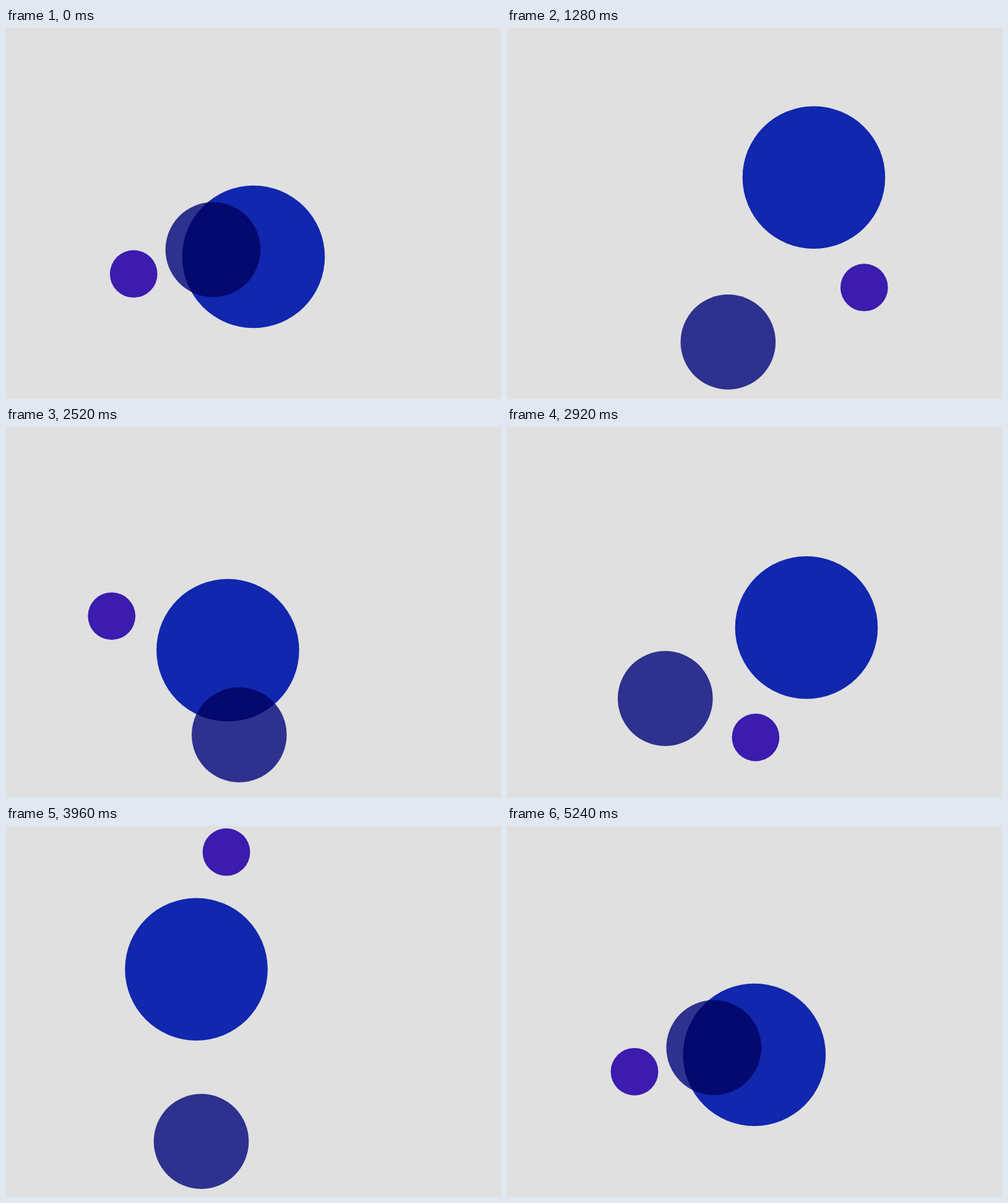
Recreate the animation shown at these times as an HTML page with a canvas. Size 800x600 px, loop 5280 ms.

```html
<!DOCTYPE html>
<html lang="en">
<head>
<meta charset="utf-8">
<title>Orbiting circles</title>
<style>
  html, body { margin: 0; width: 100%; height: 100%; overflow: hidden; background: #e0e0e0; }
  canvas { display: block; }
</style>
</head>
<body>
<canvas id="stage" width="800" height="600"></canvas>
<script>
const ctx = document.getElementById('stage').getContext('2d');
const LOOP = 5280;
const STEP = 40;
const BACK = '#e0e0e0';

// Each disc circles a pivot; angles in degrees, clockwise from the right.
const discs = [
  { x: 400, y: 270, orbit: 100, start: 90, turns: -2, r: 115.3, color: 'rgb(18,44,198)' },
  { x: 332.5, y: 435.2, orbit: 76.8, start: -88.5, turns: 3, r: 76.8, color: 'rgb(52,55,162)' },
  { x: 400, y: 270, orbit: 232, start: 146.6, turns: -2, r: 38.4, color: 'rgb(68,30,198)' }
];

const ease = t => t * t * (3 - 2 * t);

function drawDisc(d, p) {
  const a = (d.start + d.turns * 360 * p) * Math.PI / 180;
  ctx.fillStyle = d.color;
  ctx.beginPath();
  ctx.arc(d.x + d.orbit * Math.cos(a), d.y + d.orbit * Math.sin(a), d.r, 0, Math.PI * 2);
  ctx.fill();
}

function draw(now) {
  const time = Math.floor((now % LOOP) / STEP) * STEP;
  const p = ease(time / LOOP);
  ctx.globalCompositeOperation = 'source-over';
  ctx.fillStyle = BACK;
  ctx.fillRect(0, 0, 800, 600);
  ctx.globalCompositeOperation = 'multiply';
  discs.forEach(d => drawDisc(d, p));
}

function tick() {
  draw(performance.now());
  requestAnimationFrame(tick);
}

draw(0);
requestAnimationFrame(tick);
</script>
</body>
</html>
```
